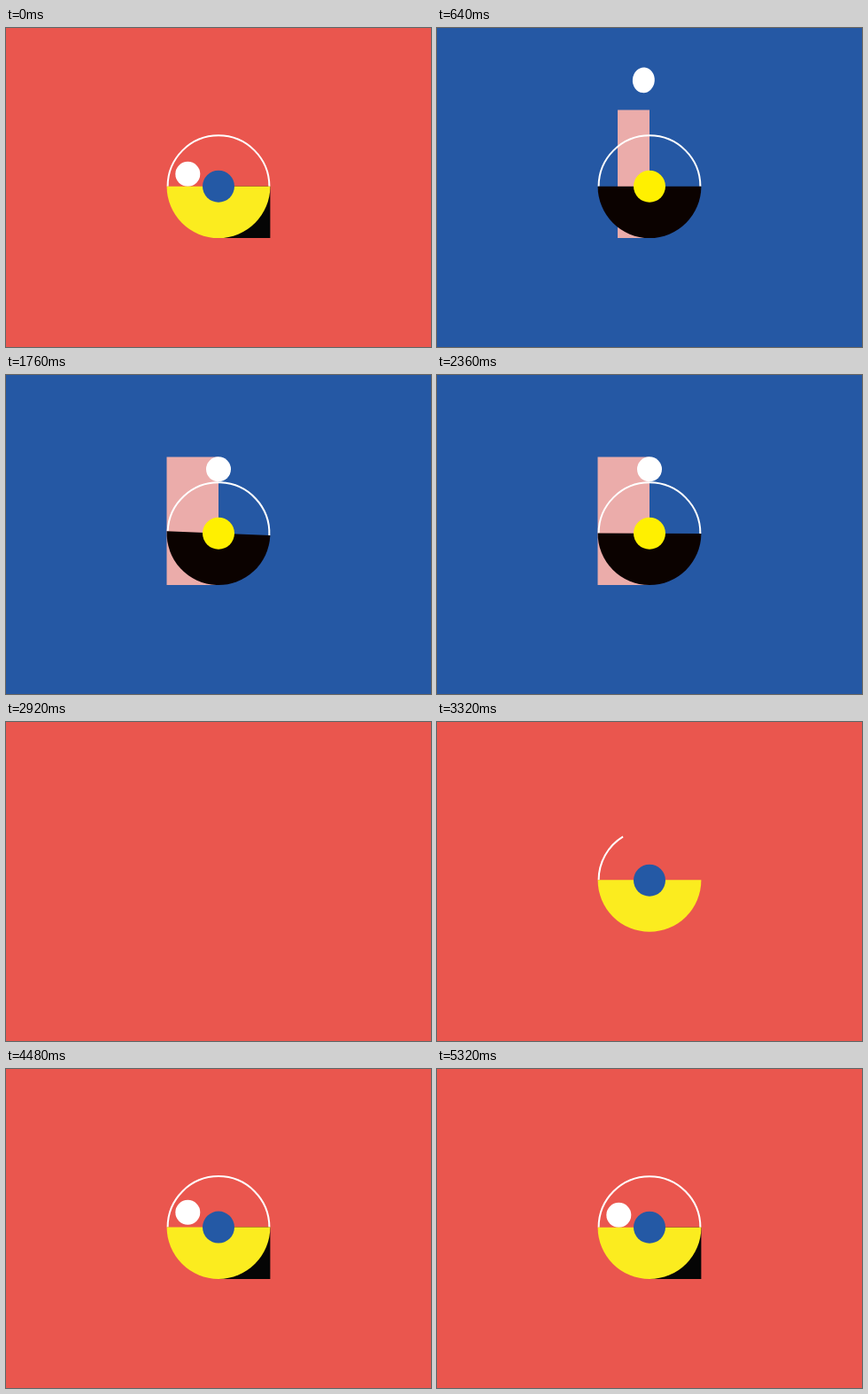
Recreate the animation shown at these times as an HTML page with a canvas. Size 480x360 px, loop 5360 ms.

```html
<!DOCTYPE html>
<html lang="en">
<head>
<meta charset="utf-8">
<title>Letters a and b</title>
<style>
html, body { margin: 0; width: 100%; height: 100%; overflow: hidden; background: #ea564e; }
canvas { display: block; width: 480px; height: 360px; }
</style>
</head>
<body>
<canvas id="stage" width="480" height="360"></canvas>
<script>
const ctx = document.getElementById('stage').getContext('2d');
const LOOP = 5360, B_START = 40, A_START = 2840;
const CX = 240, CY = 178.7, R = 58.4, BASE = 237;
const GRAVITY = 6.85e-4; // half the acceleration, px per ms²
const RED = '#ea564e', BLUE = '#2558a4', PINK = '#ebacaa', WHITE = '#fff';

const span = (t, from, to) => Math.min(1, Math.max(0, (t - from) / (to - from)));
const easeOut = u => 1 - (1 - u) ** 2;
const easeInOut = u => u < 0.5 ? 2 * u * u : 1 - 2 * (1 - u) ** 2;
const backOut = u => 1 + 2.7 * (u - 1) ** 3 + 1.7 * (u - 1) ** 2;
const damped = (s, tau, half) => Math.exp(-s / tau) * Math.cos(Math.PI * s / half);
const fallTime = h => Math.sqrt(h / GRAVITY);

function rect(x, y, w, h, color) {
  ctx.fillStyle = color;
  ctx.fillRect(x, y, w, h);
}

function oval(x, y, rx, ry, color, turn = 0) {
  if (rx <= 0) return;
  ctx.fillStyle = color;
  ctx.beginPath();
  ctx.ellipse(x, y, rx, ry, turn, 0, 2 * Math.PI);
  ctx.fill();
}

// Filled lower half with a thin arc above it, turning as one piece
function bowl(y, scale, sweep, angle, color) {
  ctx.save();
  ctx.translate(CX, y);
  ctx.rotate(angle);
  if (sweep > 0) {
    ctx.strokeStyle = WHITE;
    ctx.lineWidth = 2;
    ctx.beginPath();
    ctx.arc(0, 0, R - 1, Math.PI, Math.PI * (1 + sweep));
    ctx.stroke();
  }
  if (scale > 0) {
    ctx.fillStyle = color;
    ctx.beginPath();
    ctx.arc(0, 0, R * scale, 0, Math.PI);
    ctx.fill();
  }
  ctx.restore();
}

// Toss from (x0, y0) over a peak to (x1, y1), then ever smaller hops
function ball(t, peakTime, x0, y0, peakY, x1, y1, hops) {
  const start = peakTime - fallTime(y0 - peakY);
  const land = peakTime + fallTime(y1 - peakY);
  if (t < start) return;
  if (t < land) {
    const dt = t - peakTime;
    const speed = Math.min(0.2, 2 * GRAVITY * Math.abs(dt));
    const x = x0 + (x1 - x0) * span(t, start, land);
    oval(x, peakY + GRAVITY * dt * dt, 14 - 9 * speed, 14 + 2 * speed, WHITE, 0.08 * span(speed, 0, 0.17));
    return;
  }
  let y = y1, from = land;
  for (const h of hops) {
    const half = fallTime(h);
    if (t < from + 2 * half) {
      y = y1 - h + GRAVITY * (t - from - half) ** 2;
      break;
    }
    from += 2 * half;
  }
  oval(x1, y, 14, 14, WHITE);
}

function letterB(t) {
  rect(0, 0, 480, 360, BLUE);
  const w = 65 * easeOut(span(t, 572, 780)) - 6.5 * easeInOut(span(t, 780, 1447));
  rect(CX - w, 92.5, w, BASE - 92.5, PINK);
  ball(t, 766.7, 228, 194, 48, CX, 106.3, [11, 3, 1]);

  const s = Math.max(0, t - 1057);
  const swing = 27 * Math.exp(-s / 300) * Math.sin(2 * Math.PI * s / 600);
  bowl(CY, easeOut(span(t, 80, 300)), easeInOut(span(t, 280, 540)), swing * Math.PI / 180, '#0b0200');
  const r = 18 * backOut(span(t, 60, 260));
  oval(CX, CY, r, r, '#fff000');
}

function letterA(t) {
  rect(0, 0, 480, 360, RED);
  const s = t - 3510;
  const lift = s < 0 ? -17 * easeInOut(span(t, 3300, 3510)) : -17 * damped(s, 300, 220);
  const lag = s - 160;
  const hubLift = lag < 0 ? -4.2 * easeInOut(span(t, 3460, 3670)) : -4.2 * damped(lag, 300, 220);

  const grow = easeOut(span(t, 3600, 3800));
  const side = (BASE - CY - 1.25 * lift) * grow;
  rect(CX, BASE - side, 58.4, side, '#050505');
  ball(t, 4246, 222, 194, 138, 205.3, 164.8, [4, 1]);
  bowl(CY + lift, easeOut(span(t, 2980, 3260)), easeInOut(span(t, 3200, 3500)), 0, '#fbec1f');
  const r = 18 * backOut(span(t, 2940, 3160));
  oval(CX, CY + hubLift, r, r, '#2459a5');
}

function frame(now) {
  let t = now % LOOP;
  if (t < B_START) t += LOOP;
  if (t < A_START) letterB(t);
  else letterA(t);
  requestAnimationFrame(frame);
}
frame(0);
</script>
</body>
</html>
```
